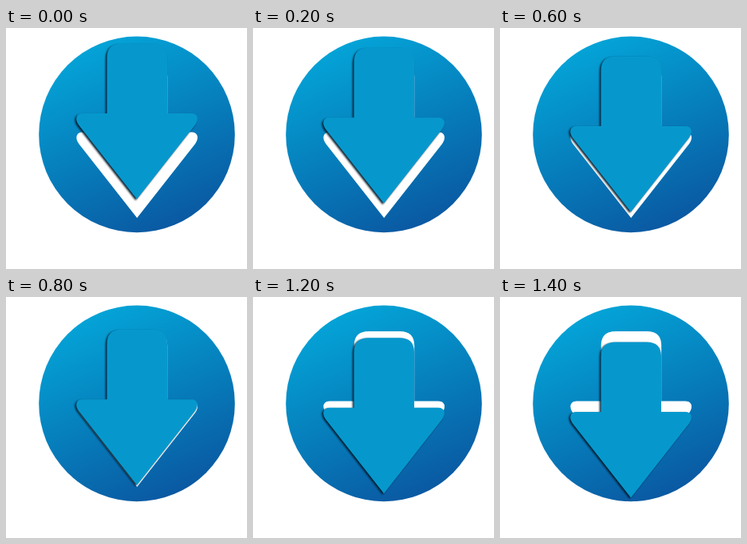
Animation, 302 px wide and 302 px high, one loop 1.6 s. Source, as an HTML page:

```html
<!DOCTYPE html>
<html lang="en">
<head>
<meta charset="utf-8">
<title>Download</title>
<style>
  html, body { margin: 0; width: 100%; height: 100%; overflow: hidden; background: #fff; }
  svg { display: block; width: 100vw; height: 100vh; }
</style>
</head>
<body>
<svg viewBox="0 0 302 302">
  <defs>
    <linearGradient id="sky" gradientUnits="userSpaceOnUse" x1="114" y1="21" x2="214" y2="246">
      <stop offset="0" stop-color="#04a3d7"/>
      <stop offset="0.5" stop-color="#067fbc"/>
      <stop offset="1" stop-color="#0a59a2"/>
    </linearGradient>
    <filter id="shade" filterUnits="userSpaceOnUse" x="70" y="-20" width="190" height="240">
      <feGaussianBlur stdDeviation="0.9"/>
    </filter>
    <!-- Arrow with its top edge at y = 0 -->
    <path id="arrow" d="M126.5 18 Q126.5 0 144.5 0 H184 Q202 0 202 18 V87.5 H232
      C240.5 87.5 242 95 237 102 L164 195 L91 102 C86 95 87.5 87.5 96 87.5 H126.5 Z"/>
  </defs>
  <circle cx="164" cy="133.4" r="122.8" fill="url(#sky)"/>
  <use href="#arrow" x="0.2" y="43" fill="#fff"/>
  <g id="mover">
    <use href="#arrow" x="-1.7" y="1.3" fill="#001a26" fill-opacity="0.95" filter="url(#shade)"/>
    <use href="#arrow" fill="#0698cd"/>
  </g>
</svg>
<script>
  const LOOP = 1600, STEP = 200;
  const TOP = 19.6, DROP = 5.27;
  const mover = document.getElementById('mover');
  const start = performance.now();

  function draw(time) {
    const step = Math.floor((time % LOOP) / STEP);
    mover.setAttribute('transform', `translate(0 ${TOP + DROP * step})`);
  }

  function tick(now) {
    draw(Math.max(0, now - start));
    requestAnimationFrame(tick);
  }

  draw(0);
  requestAnimationFrame(tick);
</script>
</body>
</html>
```
